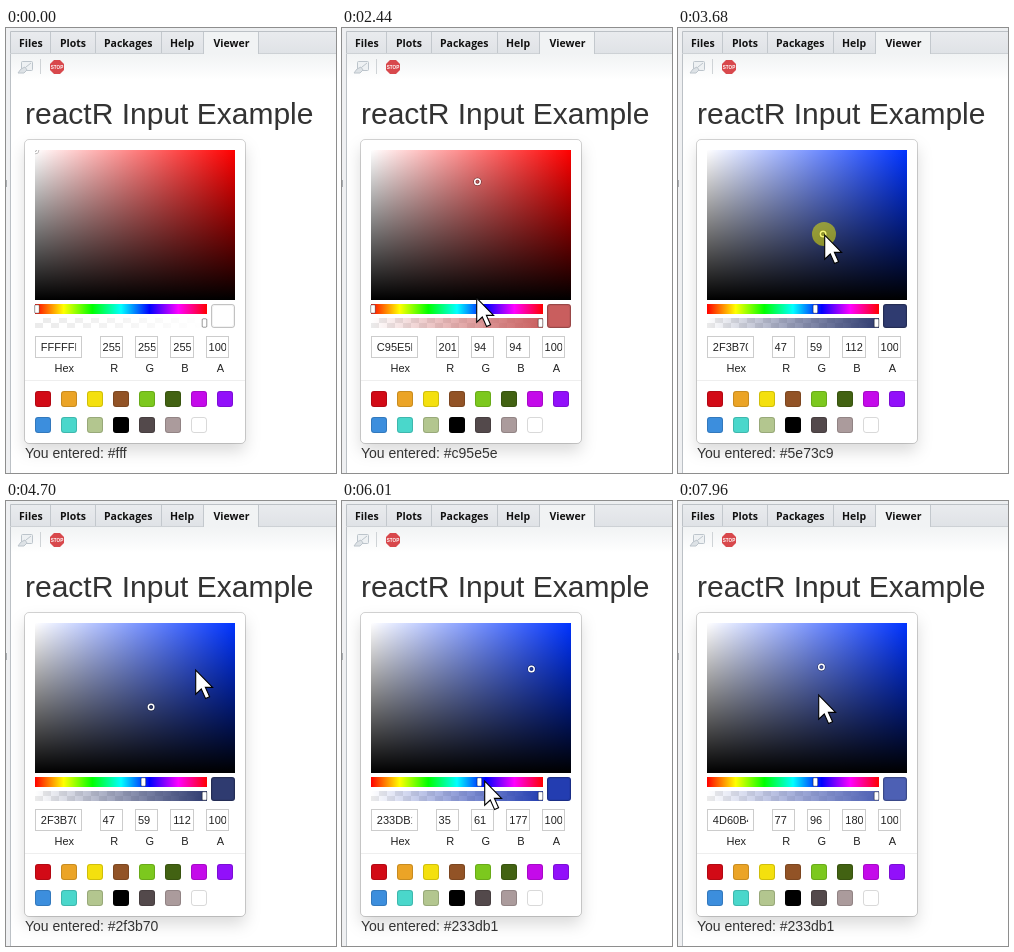
An HTML page that plays this animation: 330 px wide and 445 px high, repeating every 8000 ms.

```html
<!DOCTYPE html>
<html lang="en">
<head>
<meta charset="utf-8">
<title>Color picker input</title>
<style>
  html, body { margin: 0; width: 100%; height: 100%; overflow: hidden; background: #fff; }
  svg { display: block; width: 330px; height: 445px; }
  text { font-family: "Liberation Sans", Arial, sans-serif; }
  .tab { font: 700 10.5px "Open Sans", "Noto Sans", sans-serif; fill: #111; }
  .small { font-size: 11px; fill: #222; }
  .panel { filter: drop-shadow(0 8px 8px rgba(0,0,0,.15)); }
</style>
</head>
<body>
<svg id="stage" viewBox="0 0 330 445" xmlns="http://www.w3.org/2000/svg">
  <defs>
    <linearGradient id="tabs" x2="0" y2="1"><stop stop-color="#e9ebee"/><stop offset="1" stop-color="#dfe2e6"/></linearGradient>
    <linearGradient id="tools" x2="0" y2="1"><stop stop-color="#f1f3f4"/><stop offset="1" stop-color="#fff"/></linearGradient>
    <linearGradient id="white"><stop stop-color="#fff"/><stop offset="1" stop-color="#fff" stop-opacity="0"/></linearGradient>
    <linearGradient id="black" x2="0" y2="1"><stop stop-opacity="0"/><stop offset="1"/></linearGradient>
    <linearGradient id="hues"></linearGradient>
    <linearGradient id="fade"><stop class="tint" stop-opacity="0"/><stop class="tint" offset="1"/></linearGradient>
    <pattern id="checks" x="29" y="290" width="16" height="10" patternUnits="userSpaceOnUse">
      <path d="M8 0h8v5h-8zM0 5h8v5h-8z" fill="#000" fill-opacity=".08"/>
    </pattern>
    <clipPath id="field"><rect x="29" y="122" width="200" height="150"/></clipPath>
  </defs>

  <rect width="330" height="445" fill="#fff"/>
  <rect width="330" height="4" fill="#eceef0"/>
  <rect width="4" height="445" fill="#eff0f2"/>
  <rect y="152" width="1" height="7" fill="#a9adb1"/>
  <rect x="4" y="4" width="326" height="22" fill="url(#tabs)"/>
  <rect x="4" y="26" width="326" height="26" fill="url(#tools)"/>
  <path d="M4.5 445V3.5H330" fill="none" stroke="#bcc1c6"/>
  <path d="M4 25.5H330" stroke="#cdd1d5"/>
  <rect x="198" y="4" width="54" height="22" fill="#f1f3f4"/>
  <path d="M44.5 4v21M89.5 4v21M155.5 4v21M197.5 4v22M252.5 4v22" stroke="#c3c8cd"/>
  <g id="tabNames"></g>

  <g fill="#eef1f3" stroke="#bcc4cb">
    <rect x="15.5" y="33.5" width="11" height="9" rx="1"/>
    <path d="M12 45l3-4 4-2 2 3-3 3z" fill="#dde2e6"/>
    <path d="M20 39l5-4" fill="none"/>
  </g>
  <path d="M34.5 31v15" stroke="#cfd3d6"/>
  <path d="M48 32h6l4 4v6l-4 4h-6l-4-4v-6z" fill="#d8484c"/>
  <text x="51" y="41" text-anchor="middle" font-size="4.6" font-weight="700" fill="#fff">STOP</text>

  <text x="19" y="96" font-size="30" fill="#333">reactR Input Example</text>

  <rect class="panel" x="19" y="112" width="220" height="303" rx="4" fill="#fff"/>
  <rect x="18.5" y="111.5" width="221" height="304" rx="4.5" fill="none" stroke="#000" stroke-opacity=".17"/>
  <text id="entered" x="19" y="430" font-size="14" fill="#333"></text>

  <g clip-path="url(#field)">
    <rect id="base" x="29" y="122" width="200" height="150"/>
    <rect x="29" y="122" width="200" height="150" fill="url(#white)"/>
    <rect x="29" y="122" width="200" height="150" fill="url(#black)"/>
    <g id="marker" fill="none">
      <circle r="3.8" stroke="#000" stroke-opacity=".4"/>
      <circle r="2.75" stroke="#fff" stroke-width="1.5"/>
      <circle r="1.5" stroke="#000" stroke-opacity=".3"/>
    </g>
  </g>

  <rect x="29" y="276" width="172" height="10" fill="url(#hues)"/>
  <rect x="29" y="290" width="172" height="10" fill="url(#checks)"/>
  <rect x="29" y="290" width="172" height="10" fill="url(#fade)"/>
  <g fill="#fff" stroke="#000" stroke-opacity=".4">
    <rect id="hueKnob" y="276.8" width="4.6" height="8.4" rx="1"/>
    <rect x="196.2" y="290.8" width="4.6" height="8.4" rx="1"/>
  </g>
  <rect id="swatch" x="205" y="276" width="24" height="24" rx="3"/>
  <rect x="205.5" y="276.5" width="23" height="23" rx="2.5" fill="none" stroke="#000" stroke-opacity=".24"/>
  <rect x="206.5" y="277.5" width="21" height="21" rx="2" fill="none" stroke="#000" stroke-opacity=".05"/>

  <g id="inputs"></g>
  <path d="M19 352.5H239" stroke="#eee"/>
  <g id="presets"></g>

  <g id="pointer">
    <circle id="halo" r="12" fill="#ebeb00" fill-opacity=".52"/>
    <path d="M.7 1V25.2L6.3 20 10.6 29.6 14.6 27.8 10.4 18.4H17.6Z" fill="#fff" stroke="#000" stroke-width="1.1"/>
  </g>
</svg>
<script>
const LOOP = 8000;
const $ = id => document.getElementById(id);

// Color states; the hue stays fixed once it has been picked.
const COLORS = [
  [0, 'ffffff', 0], [1600, 'c95e5e', 0], [2908, '5e73c9', 228],
  [3680, '2f3b70', 228], [4850, '233db1', 228], [7726, '4d60b4', 228]
];
const ENTERED = [
  [0, '#fff'], [1750, '#c95e5e'], [3060, '#5e73c9'], [4010, '#2f3b70'], [5002, '#233db1']
];
const CLICKS = [[1520, 1600], [2830, 2908], [3680, 3770], [4774, 4850], [6630, 6720], [7648, 7726]];

// Pointer moves: first step, last step, step count, ease-out power, curve points.
const MOVES = [
  [380, 1210, 12, 1.6, [313, 460], [224, 307], [135, 154]],
  [1980, 2750, 11, 2.4, [135, 154], [115, 220], [138, 280]],
  [3141, 3530, 6, 2, [138, 280], [148, 240], [146, 206]],
  [4470, 4698, 4, 1.5, [146, 206], [168, 187], [189, 168]],
  [5078, 5772, 10, 1.25, [189, 168], [161, 231], [132, 294]],
  [5849, 6160, 5, 2, [132, 294], [139, 284], [143, 276]],
  [6330, 6480, 3, 1.3, [143, 276], [142, 285], [142, 294]],
  [7180, 7492, 5, 1.8, [142, 294], [142, 230], [143, 166]],
  [7882, 7960, 2, 1, [143, 166], [142, 179], [140, 193]]
];

const INPUTS = ['Hex', 'R', 'G', 'B', 'A'].map((name, i) => {
  const unit = 176 / 6;
  const x = i ? 29 + 2 * unit + 6 + (i - 1) * (unit + 6) : 29;
  return { name, x, w: i ? unit : 2 * unit };
});

const PRESETS = ('d20a16 eba426 f4e00e 925326 7cc81e 426212 c40aea 9210fa ' +
  '3c8edd 4ad7cb b3c68f 000000 53494b ab9b9c ffffff').split(' ');

function build() {
  $('tabNames').innerHTML = [['Files', 13], ['Plots', 54], ['Packages', 98], ['Help', 164], ['Viewer', 207.5]]
    .map(([name, x]) => `<text class="tab" x="${x}" y="19">${name}</text>`).join('');

  $('hues').innerHTML = [0, 60, 120, 180, 240, 300, 360]
    .map(h => `<stop offset="${h / 360}" stop-color="hsl(${h},100%,50%)"/>`).join('');

  $('inputs').innerHTML = INPUTS.map(({ name, x, w }) => {
    const left = Math.round(x), right = Math.round(x + w * .8);
    return `<clipPath id="clip${name}"><rect x="${x + w * .1}" y="309" width="${w * .6}" height="20"/></clipPath>
      <rect x="${left + .5}" y="308.5" width="${right - left - 1}" height="21" fill="#fff" stroke="#ccc"/>
      <g clip-path="url(#clip${name})"><text id="value${name}" class="small" x="${x + w * .1}" y="323"></text></g>
      <text class="small" x="${x + w / 2}" y="344" text-anchor="middle">${name}</text>`;
  }).join('');

  $('presets').innerHTML = PRESETS.map((hex, i) => {
    const x = 29 + i % 8 * 26, y = 363 + Math.floor(i / 8) * 26;
    return `<rect x="${x}" y="${y}" width="16" height="16" rx="3" fill="#${hex}"/>
      <rect x="${x + .5}" y="${y + .5}" width="15" height="15" rx="2.5" fill="none" stroke="#000" stroke-opacity=".15"/>`;
  }).join('');
}

const latest = (list, t) => list.filter(item => item[0] <= t).pop();

function pointerAt(t) {
  const move = latest(MOVES, t);
  if (!move) return null;
  const [start, end, count, power, a, b, c] = move;
  const gap = (end - start) / (count - 1);
  const step = Math.min(count, Math.floor((t - start + 8) / gap) + 1);
  const u = 1 - (1 - step / count) ** power, v = 1 - u;
  return [0, 1].map(i => Math.round(v * v * a[i] + 2 * u * v * b[i] + u * u * c[i]));
}

function showColor(hex, hue) {
  const rgb = [0, 2, 4].map(i => parseInt(hex.slice(i, i + 2), 16));
  const max = Math.max(...rgb), min = Math.min(...rgb);
  const x = 29 + 200 * (max - min) / max;
  const y = 122 + 150 * (1 - max / 255);
  $('marker').setAttribute('transform', `translate(${x} ${y})`);
  $('base').setAttribute('fill', `hsl(${hue},100%,50%)`);
  $('hueKnob').setAttribute('x', 28.7 + 168 * hue / 360);
  $('swatch').setAttribute('fill', '#' + hex);
  document.querySelectorAll('.tint').forEach(stop => stop.setAttribute('stop-color', '#' + hex));
  [hex.toUpperCase(), ...rgb, 100].forEach((value, i) => {
    $('value' + INPUTS[i].name).textContent = value;
  });
}

function render(t) {
  const [, hex, hue] = latest(COLORS, t);
  showColor(hex, hue);
  $('entered').textContent = 'You entered: ' + latest(ENTERED, t)[1];

  const pos = pointerAt(t);
  $('pointer').setAttribute('visibility', pos ? 'visible' : 'hidden');
  if (pos) $('pointer').setAttribute('transform', `translate(${pos})`);
  const pressed = CLICKS.some(([from, to]) => t >= from && t < to);
  $('halo').setAttribute('opacity', pressed ? 1 : 0);
}

build();
render(0);
let begin;
requestAnimationFrame(function frame(now) {
  begin ??= now;
  render((now - begin) % LOOP);
  requestAnimationFrame(frame);
});
</script>
</body>
</html>
```
